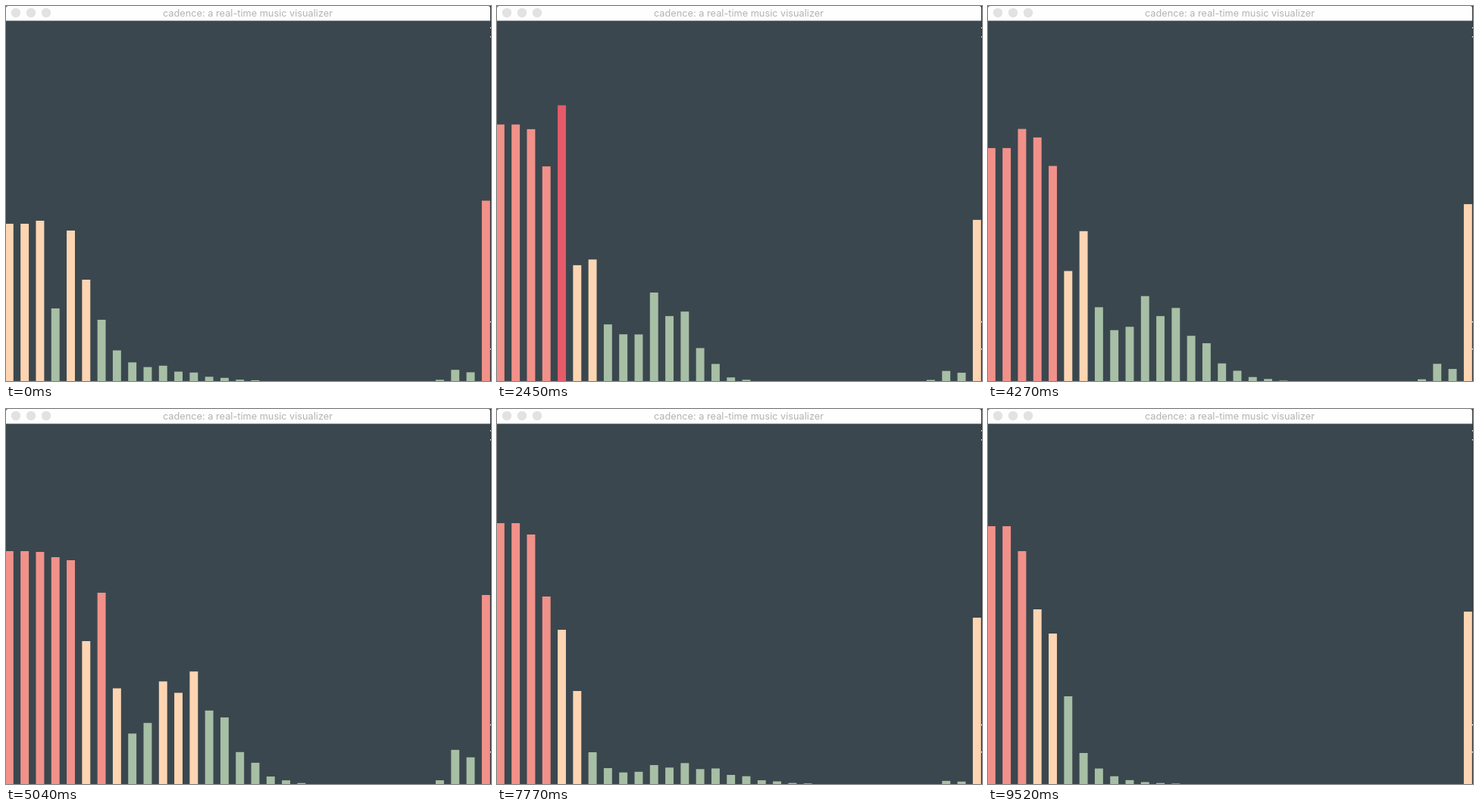
Recreate the animation shown at these times as an HTML page with a canvas. Size 640 by 496 pixels, loop 9.59 s.

```html
<!DOCTYPE html>
<html lang="en">
<head>
<meta charset="utf-8">
<title>cadence</title>
<style>
  html, body { margin: 0; width: 100%; height: 100%; overflow: hidden; background: #3b474e; }
  #stage { position: relative; width: 640px; height: 496px; overflow: hidden; }
  canvas { position: absolute; left: 0; top: 0; }
  #title {
    position: absolute; left: 0; top: 0; width: 638px; height: 20px;
    text-align: center; white-space: nowrap;
    font: 12.75px/19px Inter, Roboto, sans-serif; color: #b3b3b3;
  }
</style>
</head>
<body>
<div id="stage">
  <canvas id="view" width="640" height="496"></canvas>
  <div id="title">cadence: a real-time music visualizer</div>
</div>
<script>
const ctx = document.getElementById('view').getContext('2d');
const W = 640, H = 496, BAR_TOP = 20, BARS = 32;
const LOOP = 9590, STEP = 70, KNOT = 140;
const BEAT = 665, FIRST_BEAT = 595;
const HOLDS = [2240, 3290, 6510, 6650, 9170];
const COLORS = ['#a7bfa5', '#fdd5b2', '#f1918a', '#e65b6a'];

// Key moods of the tune: bass bands, one mid-range hump, a small treble hump
// and the last band.
const MOODS = [
  { t: 0, bass: [208, 212, 96, 199, 134, 81], mid: { at: 8, wide: 4.5, high: 22 }, treble: 18, last: 238.5 },
  { t: 1470, bass: [370, 381, 285, 440, 231, 166], mid: { at: 11, wide: 2.3, high: 160 }, treble: 33, last: 226 },
  { t: 3500, bass: [321, 339, 321, 269, 95, 145], mid: { at: 8.5, wide: 3.8, high: 75 }, treble: 0, last: 221 },
  { t: 5040, bass: [308, 307, 300, 296, 189, 253], mid: { at: 11.3, wide: 3.6, high: 138 }, treble: 55, last: 250 },
  { t: 6160, bass: [259, 308, 314, 289, 135, 130], mid: { at: 12, wide: 1.2, high: 70 }, treble: 0, last: 165 },
  { t: 7770, bass: [345, 330, 248, 204, 123, 42], mid: { at: 11.5, wide: 4.5, high: 25 }, treble: 5, last: 220 },
  { t: 9520, bass: [341, 308, 231, 199, 116, 41], mid: { at: 9, wide: 3, high: 0 }, treble: 0, last: 228 }
];

const mix = (a, b, k) => a + (b - a) * k;
const smooth = k => k * k * (3 - 2 * k);
const hump = (x, at, wide) => Math.exp(-(((x - at) / wide) ** 2));

function hash(a, b) {
  const v = Math.sin(a * 127.1 + b * 311.7) * 43758.5453;
  return (v - Math.floor(v)) * 2 - 1;
}

function noise(band, t) {
  const x = t / KNOT, n = Math.floor(x);
  return mix(hash(n, band), hash(n + 1, band), smooth(x - n));
}

function level({ bass, mid, treble, last }, band) {
  if (band === BARS - 1) return last;
  if (band <= bass.length) return bass[band - 1];
  // Beyond the bass each band halves; even bands ring a little louder.
  const decay = bass.at(-1) * 0.5 ** (band - bass.length);
  const ripple = 1 + 0.12 * Math.cos(Math.PI * band);
  const body = mid.high * ripple * hump(band, mid.at, mid.wide);
  return Math.max(decay, body, treble * hump(band, 29.4, 0.9));
}

function height(band, t) {
  const n = Math.max(0, MOODS.findIndex(m => t <= m.t) - 1);
  const a = MOODS[n], b = MOODS[n + 1];
  const k = (t - a.t) / (b.t - a.t);
  const base = mix(level(a, band), level(b, band), smooth(k));
  // The moods already include their beat, so the swing fades near them.
  const free = Math.min(1, (t - a.t) / 280, (b.t - t) / 280);
  const phase = ((t - FIRST_BEAT + BEAT) % BEAT) / BEAT;
  const swing = 0.16 * Math.exp(-4 * phase) - 0.03 + 0.13 * noise(band, t);
  return Math.min(470, base * (1 + free * swing));
}

function drawWindow() {
  ctx.fillStyle = '#3b474e';
  ctx.fillRect(0, 0, W, H);
  ctx.fillStyle = '#2c3337';
  ctx.fillRect(639, 0, 1, H);
  ctx.fillStyle = '#fefefe';
  ctx.beginPath();
  ctx.roundRect(0, 0, 639, BAR_TOP - 0.4, [3, 3, 0, 0]);
  ctx.fill();
  for (const y of [28, 40, 417, 453]) ctx.fillRect(639, y, 1, 1.5);
  ctx.fillStyle = '#e2e2e2';
  for (const x of [13, 33, 53]) {
    ctx.beginPath();
    ctx.arc(x, 9, 6.2, 0, Math.PI * 2);
    ctx.fill();
  }
}

function draw(now) {
  let t = Math.floor((now % LOOP) / STEP) * STEP;
  if (HOLDS.includes(t)) t -= STEP;
  drawWindow();
  for (let i = 0; i < BARS; i++) {
    const h = height(Math.max(i, 1), t); // the first two bars move as one
    if (h < 0.5) continue;
    const quarter = Math.min(3, Math.floor(h / ((H - BAR_TOP) / 4)));
    ctx.fillStyle = COLORS[quarter];
    ctx.fillRect(i * 20.29 - 1.1, H - h, 10.9, h);
  }
}

function tick() {
  draw(performance.now());
  requestAnimationFrame(tick);
}
tick();
</script>
</body>
</html>
```
